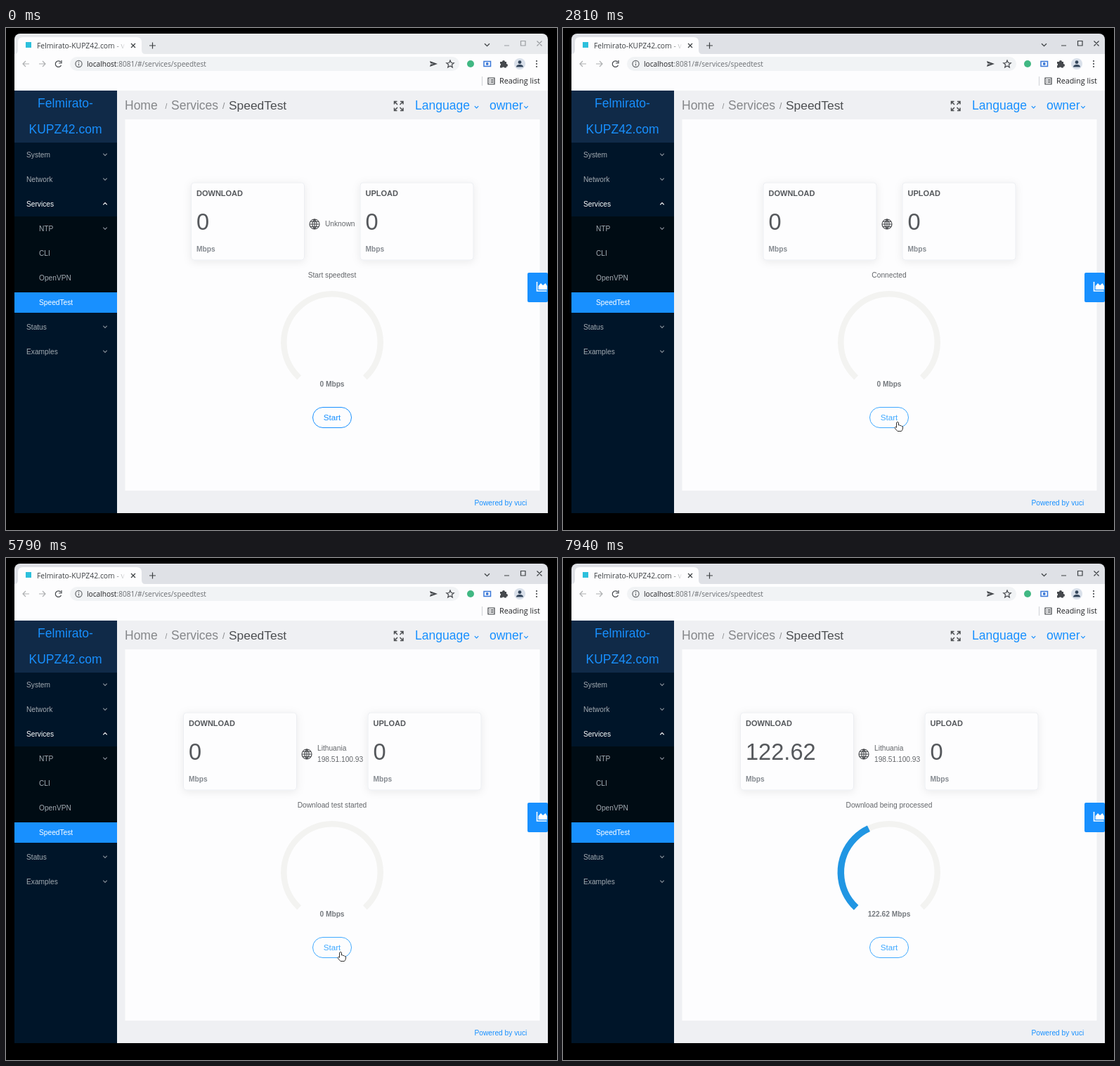
Recreate the animation shown at these times as an HTML page. Size 784x714 px, loop 8 s.

```html
<!DOCTYPE html>
<html lang="en">
<head>
<meta charset="utf-8">
<title>Speed test</title>
<style>
  html, body { margin: 0; width: 100%; height: 100%; overflow: hidden; background: #000; }
  svg { display: block; width: 784px; height: 714px; font-family: "Liberation Sans", Arial, sans-serif; font-size: 10.2px; }
  .ui { font-family: "Open Sans", "Noto Sans", sans-serif; }
  .line { fill: none; stroke-width: 1.2; }
</style>
</head>
<body>
<svg id="stage" viewBox="0 0 784 714"></svg>
<script>
const stage = document.getElementById('stage');
const BLUE = '#1890ff', GREY = '#63666a';

const text = (x, y, s, fill, size = 10.2, more = '') =>
  `<text x="${x}" y="${y}" fill="${fill}" font-size="${size}" ${more}>${s}</text>`;
const box = (x, y, w, h, fill, more = '') =>
  `<rect x="${x}" y="${y}" width="${w}" height="${h}" fill="${fill}" ${more}/>`;
const line = (d, stroke, more = '') => `<path class="line" d="${d}" stroke="${stroke}" ${more}/>`;
const shape = (d, fill, more = '') => `<path d="${d}" fill="${fill}" ${more}/>`;
const chevron = (x, y, stroke, dir = 1, r = 2.7) =>
  line(`M${x - r} ${y - dir * r / 2}l${r} ${dir * r}l${r} ${-dir * r}`, stroke);
const group = (id, body) => `<g id="${id}">${body}</g>`;
const BOLD = 'font-weight="700"', MID = 'text-anchor="middle"';

function browser() {
  const dark = '#45484c';
  return box(12, 8, 759, 40, '#dfe1e6', 'id="strip" rx="8"') +
    shape('M12 37Q17 37 17 31V20Q17 13 24 13H186Q193 13 193 20V31Q193 37 198 37Z', '#fdfdfe') +
    box(12, 37, 759, 52, '#fdfdfe') +
    box(28, 20, 8, 8, '#2cc0dc') +
    text(44, 29, 'Felmirato-KUPZ42.com - v', 'url(#tabFade)', 10.4, 'class="ui"') +
    line('M178 22l6 6M184 22l-6 6M208.5 20.5v9M204 25h9', '#3c4043') +
    chevron(684.5, 24, '#3c4043', 1, 3.5) +
    group('controls', line('M709 25h7M732.5 18.5h6.5v6.5h-6.5zM755.5 18.5l7 7M762.5 18.5l-7 7', 'currentColor')) +
    line('M33 51h-9m4-4l-4 4l4 4M47 51h9m-4-4l4 4l-4 4', '#aeb0b2') +
    line('M78 48.5A4.3 4.3 0 1 0 78.5 53M79 46v4h-4', dark) +
    box(91, 41, 554, 20, '#f1f3f5', 'rx="10"') +
    `<circle cx="103.5" cy="51" r="4.6" class="line" stroke="${GREY}"/>` +
    line('M103.5 50.5v3M103.5 48v1.2', GREY) +
    text(115, 55, 'localhost<tspan fill="#6b6e72">:8081/#/services/speedtest</tspan>', '#202124', 10.15, 'class="ui"') +
    shape('M603 47l11 4l-11 4l1-3.3l5-.7l-5-.7z', dark) +
    line('M632 46l1.5 3.5l3.8.3l-2.9 2.5l.9 3.7l-3.3-2l-3.3 2l.9-3.7l-2.9-2.5l3.8-.3z', dark) +
    '<circle cx="661" cy="51" r="5" fill="#41b883"/>' +
    line('M680 47.5h9.5v7h-9.5z', '#3b78d8', 'style="stroke-width:1.5"') +
    '<circle cx="684.7" cy="51" r="1.9" fill="#3b78d8"/>' +
    shape('M703 48h3a2 2 0 1 1 4 0h2v3a2 2 0 1 1 0 4v1.500h-3a1.600 1.600 0 0 0-3 0h-3v-3a1.600 1.600 0 0 0 0-3z', dark) +
    '<circle cx="731" cy="51" r="8" fill="#d9e0ea"/><circle cx="731" cy="48.7" r="2.4" fill="#34465c"/>' +
    shape('M726 55.500q0-3.500 5-3.500t5 3.500z', '#34465c') +
    [47, 51, 55].map(y => `<circle cx="755" cy="${y}" r="1.1" fill="${dark}"/>`).join('') +
    line('M677.5 69v13', '#d4d6d9') +
    line('M686 71h9v9h-9zM688 73.5h1M688 75.5h1M688 77.5h1M690 73.5h3.5M690 75.5h3.500M690 77.5h3.500', '#3c4043') +
    text(702, 79, 'Reading list', '#202124', 10.8, 'class="ui"');
}

function sidebar() {
  const items = [['System', 180, 1], ['Network', 215, 1], ['Services', 250, -1], ['NTP', 285, 1], ['CLI', 320],
    ['OpenVPN', 355], ['SpeedTest', 390], ['Status', 425, 1], ['Examples', 460, 1]];
  return box(12, 89, 146, 601, '#001529') + box(12, 89, 146, 74, '#102a48') +
    box(12, 268, 146, 137, '#000c14') + box(12, 376, 146, 29, BLUE) +
    text(84.5, 113, 'Felmirato-', BLUE, 17.5, MID) + text(84.5, 150, 'KUPZ42.com', BLUE, 17.5, MID) +
    items.map(([name, y, dir]) => {
      const sub = y > 270 && y < 400, lit = name === 'Services' || name === 'SpeedTest';
      const color = lit ? '#fff' : '#a3abb2';
      return text(sub ? 47 : 29, y + 3.7, name, color) +
        (dir ? chevron(141, y, lit ? '#fff' : '#87919a', dir) : '');
    }).join('');
}

function header() {
  return text(169, 115.500, 'Home', '#85878a', 17.5) + text(226.5, 115, '/', '#85878a') +
    text(235, 115.500, 'Services', '#85878a', 17.5) + text(308, 115, '/', '#85878a', 12) +
    text(317, 115.500, 'SpeedTest', '#4d4f52', 17.4) +
    line('M557 109l-4-4M552.500 108.500v-4h4M560.500 109l4-4M561 104.500h4v4M557 113l-4 4M552.500 113.500v4h4M560.500 113l4 4M561 117.500h4v-4', '#4d4f52', 'style="stroke-width:1.5"') +
    text(582, 115.500, 'Language', BLUE, 17.5) + chevron(669.500, 112.500, BLUE) +
    text(688, 115.500, 'owner', BLUE, 17.5) + chevron(740, 112.500, BLUE);
}

const card = (id, title) => group(id,
  box(0, 220, 161, 110, '#fdfdfe', 'rx="4" stroke="#eceef2" filter="url(#shadow)"') +
  text(7.5, 239, title, '#55585c', 11, BOLD) +
  text(7.500, 287, '0', '#55585c', 32.6, `id="${id}Value"`) +
  text(7.500, 318, 'Mbps', '#858a90', 10.2, BOLD));

const ARC = 274, RADIUS = 68.7;
function arcPath() {
  const point = deg => [464 + RADIUS * Math.sin(deg * Math.PI / 180), 447 - RADIUS * Math.cos(deg * Math.PI / 180)];
  return `M${point(-ARC / 2)}A${RADIUS} ${RADIUS} 0 1 1 ${point(ARC / 2)}`;
}

function page() {
  return box(158, 89, 613, 601, '#eff0f3') + box(169.5, 130, 590, 528, '#fdfdfe') + header() +
    card('down', 'DOWNLOAD') + card('up', 'UPLOAD') +
    group('globe', line('M-7 0a7 7 0 1 0 14 0a7 7 0 1 0-14 0zM-7 0h14M0-7v14M-6-3.500h12M-6 3.500h12M0-7q-6.500 7 0 14q6.500-7 0-14', '#4d4f52')) +
    text(454, 282, 'Unknown', GREY, 10.2, 'id="unknown"') +
    group('place', text(443, 274, 'Lithuania', GREY) + text(443, 289.500, '198.51.100.93', GREY)) +
    text(464, 355, '', GREY, 10.2, `id="status" ${MID}`) +
    shape(arcPath(), 'none', 'stroke="#f3f3f1" stroke-width="8.5"') +
    shape(arcPath(), 'none', `id="gauge" stroke="#2196e3" stroke-width="9.5" pathLength="${ARC}"`) +
    text(464, 509.500, '', '#75797e', 10.2, `id="speed" ${MID} ${BOLD}`) +
    box(0, 0, 0, 0, 'none', `id="wave" stroke="${BLUE}"`) +
    group('button', box(436.5, 539.5, 55, 29, '#fdfdfe', 'rx="14.5" stroke="currentColor"') +
      text(464, 557.500, 'Start', 'currentColor', 11.7, MID)) +
    box(742, 348, 29, 42, BLUE, 'rx="2"') +
    line('M755.500 361v13h14', '#fff', 'style="stroke-width:1.6"') +
    shape('M757.500 372v-5l3.500-4l3 3l3.500-3l2.500 4v5z', '#fff') +
    text(666.500, 679, 'Powered by vuci', BLUE);
}

stage.innerHTML = `<defs>
  <linearGradient id="tabFade" gradientUnits="userSpaceOnUse" x1="150" x2="171" y1="0" y2="0">
    <stop stop-color="#3c4043"/><stop offset="1" stop-color="#3c4043" stop-opacity="0"/></linearGradient>
  <filter id="shadow" x="-20%" y="-25%" width="140%" height="150%">
    <feDropShadow dx="0" dy="2" stdDeviation="6" flood-color="#000" flood-opacity=".08"/></filter></defs>` +
  browser() + page() + sidebar() +
  group('arrow', shape('M0 0V11L2.600 8.700L4.500 12.500L6.300 11.600L4.600 8H8Z', '#111', 'stroke="#fff" stroke-width=".8"')) +
  group('hand', shape('M-1.500 1.200Q0-.8 1.500 1.200V5Q3 4.200 3.800 5.600Q5.300 5 5.900 6.400Q7.600 6 7.600 8Q7.600 11.500 5.500 13.500H0Q-2-11-.1 13.500Q-2.500 11-4.200 8.500Q-3.500 6.500-1.500 8.200Z'.replace('Q-2-11-.1 13.500', ''), '#fff', 'stroke="#333" stroke-width="1"'));

const el = {};
stage.querySelectorAll('[id]').forEach(node => el[node.id] = node);

const clamp = v => Math.max(0, Math.min(1, v));
const smooth = v => v * v * (3 - 2 * v);
const show = (node, on) => node.setAttribute('visibility', on ? 'visible' : 'hidden');
const move = (node, x, y = 0) => node.setAttribute('transform', `translate(${x} ${y})`);
const latest = (steps, t) => steps.filter(s => s[0] <= t).pop();

// [time, x, y]
const PATH = [[800, -8, 620], [1180, 253, 497], [1600, 253, 497], [2030, 458, 561], [2180, 458, 561],
  [2310, 489, 569], [2440, 476, 560], [5790, 476, 560], [5900, 478, 583], [8000, 478, 583]];
// [time, download x, upload x, globe x]
const LAYOUT = [[0, 263.5, 504, 439], [2810, 285, 483, 461], [3200, 252.5, 515, 428]];
const STATUS = [[0, 'Start speedtest'], [2810, 'Connected'], [3200, 'Searching for fastest server'],
  [3870, 'Selected fastest server'], [4760, 'Download test started'], [7290, 'Download being processed']];

function cursorAt(t) {
  const i = Math.max(1, PATH.findIndex(p => p[0] > t));
  const [a, b] = [PATH[i - 1], PATH[i]];
  const k = smooth(clamp((t - a[0]) / (b[0] - a[0])));
  return [a[1] + (b[1] - a[1]) * k, a[2] + (b[2] - a[2]) * k];
}

function draw(t) {
  const focused = t >= 800;
  el.strip.setAttribute('fill', focused ? '#dfe1e6' : '#e8eaed');
  el.controls.style.color = focused ? '#3c4043' : '#9a9da1';

  const [, downX, upX, globeX] = latest(LAYOUT, t);
  move(el.down, downX);
  move(el.up, upX);
  move(el.globe, globeX, 279);
  show(el.unknown, t < 2810);
  show(el.place, t >= 3200);
  el.status.textContent = latest(STATUS, t)[1];

  const value = t < 7290 ? '0' : '122.62';
  el.downValue.textContent = value;
  el.speed.textContent = value + ' Mbps';
  const filled = 112 * (1 - (1 - clamp((t - 7290) / 480)) ** 3);
  el.gauge.setAttribute('stroke-dasharray', `${filled} 400`);
  show(el.gauge, filled > 0);

  const hover = clamp((t - 1980) / 300);
  el.button.style.color = `rgb(${24 + 40 * hover},${144 + 25 * hover},255)`;
  const spread = 6 * (1 - (1 - clamp((t - 2810) / 400)) ** 4);
  const ring = { x: 436 - spread / 2, y: 539 - spread / 2, width: 56 + spread, height: 30 + spread,
    rx: 15 + spread / 2, 'stroke-width': spread, opacity: .2 * (1 - clamp((t - 2810) / 750)) ** 3 };
  for (const key in ring) el.wave.setAttribute(key, ring[key]);

  const [x, y] = cursorAt(t);
  const over = x > 437 && x < 492 && y > 540 && y < 568;
  const visible = t >= 800 && t < 7940;
  move(el.arrow, x, y);
  move(el.hand, x, y);
  show(el.arrow, visible && !over);
  show(el.hand, visible && over);
}

const start = performance.now();
function tick() {
  draw((performance.now() - start) % 8000);
  requestAnimationFrame(tick);
}
tick();
</script>
</body>
</html>
```
